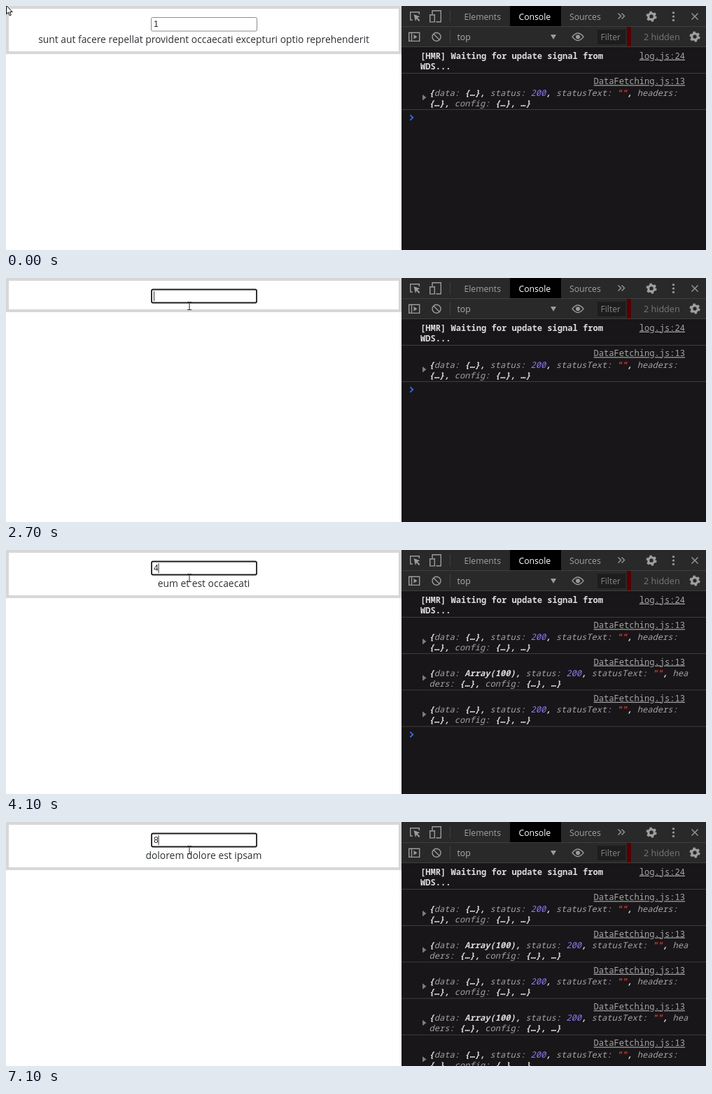
An HTML page that plays this animation: 1000x350 px, repeating every 7200 ms.

```html
<!DOCTYPE html>
<html lang="en">
<head>
<meta charset="utf-8">
<title>Data fetching demo</title>
<style>
  html, body { margin: 0; width: 100%; height: 100%; overflow: hidden; background: #fff; }
  svg { display: block; }
  text { white-space: pre; }
  .ui { font: 12.2px "Open Sans", "Noto Sans", sans-serif; fill: #a2a2a2; }
  .body { font: 13.86px "Open Sans", "Noto Sans", sans-serif; fill: #2b2f33; }
  .field { font: 12px "Liberation Sans", Arial, sans-serif; fill: #2a2a2a; }
  .mono { font: 600 12.08px "Noto Sans Mono", "DejaVu Sans Mono", monospace; fill: #dcdcdc; }
  .obj { font-style: italic; }
  .key { fill: #a3a3a3; font-weight: 500; }
  .num { fill: #8f78f5; font-weight: 500; }
  .str { fill: #d23c36; }
  .link { fill: #a6a6a6; text-decoration: underline; text-anchor: end; font-weight: 400; }
  .icon { fill: none; stroke: #9b9b9b; stroke-width: 1.4; }
  .solid { fill: #9b9b9b; }
  .rule { fill: #3e3e3e; }
</style>
</head>
<body>
<svg width="1000" height="350" viewBox="0 0 1000 350">
  <defs>
    <g id="gear">
      <circle r="4.3" fill="none" stroke="#a0a0a0" stroke-width="3.2"/>
      <circle r="6.4" fill="none" stroke="#a0a0a0" stroke-width="2.4" stroke-dasharray="3.35 3.35"/>
    </g>
  </defs>

  <rect width="1000" height="350" fill="#fff"/>
  <rect id="card" x="2" y="2" width="561" height="65" fill="#fff" stroke="#d7d7d7" stroke-width="4"/>
  <rect id="box" fill="#fff"/>
  <text id="value" class="field" x="211" y="30"></text>
  <rect id="caret" y="19" width="1" height="14" fill="#333"/>
  <text id="post" class="body" x="282.5" y="52.5" text-anchor="middle"></text>

  <rect x="565" width="435" height="350" fill="#181618"/>
  <rect x="565" width="435" height="58" fill="#292929"/>
  <rect x="720" width="73" height="29" fill="#000"/>
  <rect class="rule" x="565" y="29" width="435" height="1"/>
  <rect class="rule" x="565" y="58" width="435" height="1"/>
  <rect class="rule" x="634" y="6" width="1" height="18"/>
  <rect class="rule" x="634" y="35" width="1" height="18"/>
  <rect x="845" y="34" width="40" height="21" fill="#1d1d1d"/>
  <rect x="887" y="30" width="6" height="28" fill="#580000"/>

  <text class="ui" x="654.5" y="20">Elements</text>
  <text class="ui" x="732.5" y="20" style="fill:#fff">Console</text>
  <text class="ui" x="805" y="20">Sources</text>
  <text class="ui" x="644.5" y="49" style="fill:#b0b0b0">top</text>
  <text class="ui" x="849.5" y="49" style="fill:#858585">Filter</text>
  <text class="ui" x="911" y="49" style="fill:#777;font-size:12.6px">2 hidden</text>

  <path class="icon" d="M581 20h-3.3v-11.3h12.6v3.3"/>
  <path class="solid" d="M582.5 12l9 3.3-3.7 1.5 3.6 3.6-1.5 1.5-3.6-3.6-1.4 3.6z"/>
  <path class="icon" d="M609 12v-5.3h12.3v16h-7M605.7 12.7h6.6v10.2h-6.6z"/>
  <path class="icon" d="M874.5 10.5l4 4-4 4M879.5 10.5l4 4-4 4"/>
  <use href="#gear" x="922" y="15"/>
  <g class="solid"><circle cx="953.5" cy="9.7" r="1.6"/><circle cx="953.5" cy="15" r="1.6"/><circle cx="953.5" cy="20.3" r="1.6"/></g>
  <path class="icon" d="M979.5 10.5l9 9m0-9l-9 9"/>

  <path class="icon" d="M575.7 38.2h15v12.2h-15zM579.5 38v12.5"/>
  <path class="solid" d="M582.5 41l5 3.3-5 3.3z"/>
  <circle class="icon" cx="615" cy="44.3" r="6"/>
  <path class="icon" d="M610.8 40.1l8.4 8.4"/>
  <path class="solid" d="M778 41h8l-4 7z"/>
  <path class="icon" d="M809 44.2q8-10.5 16 0q-8 10.5-16 0z"/>
  <circle class="solid" cx="817" cy="44.2" r="3"/>
  <use href="#gear" x="984" y="44"/>

  <text class="mono" x="592" y="75.8">[HMR] Waiting for update signal from</text>
  <text class="mono" x="592" y="91">WDS...</text>
  <text class="mono link" x="970" y="75.8">log.js:24</text>
  <rect class="rule" x="565" y="96" width="435" height="1"/>
  <g id="logs"></g>
  <path id="prompt" d="M577.3 156.3l4 3.8-4 3.8" fill="none" stroke="#3a6ce0" stroke-width="1.8"/>

  <path id="arrow" d="M.5 -.5v12.2l2.8-2.6 2 4.7 2-.9-2-4.5h3.8z" fill="#fff" stroke="#000" stroke-width="1"/>
  <path id="beam" d="M-3 -5.5h2.2l.8.7.8-.7h2.2M0 -5v10M-3 5.5h2.2l.8-.7.8.7h2.2" fill="none" stroke="#333" stroke-width="1.1"/>
</svg>
<script>
const LOOP = 7200, STEP = 100, PITCH = 52.3;
const $ = id => document.getElementById(id);
const set = (el, attrs) => { for (const k in attrs) el.setAttribute(k, attrs[k]); };
const show = (el, on) => { el.style.display = on ? '' : 'none'; };

// Each track lists [start time, value]; the last one started applies.
const at = (track, t) => track.reduce((v, [s, x]) => t >= s ? x : v, track[0][1]);

const values = [[0, '1'], [2500, ''], [3700, '4'], [5100, ''], [6100, '8']];
const posts = [
  [0, 'sunt aut facere repellat provident occaecati excepturi optio reprehenderit'],
  [2700, ''], [3900, 'eum et est occaecati'],
  [5300, ''], [6300, 'dolorem dolore est ipsam']
];
const counts = [[0, 1], [2800, 2], [3900, 3], [5400, 4], [6300, 5]];
const carets = [
  [0, false], [1300, true], [1800, false], [2300, true], [3000, false], [3400, true],
  [4200, false], [4700, true], [5800, false], [6100, true], [6600, false], [7100, true]
];
const path = [[0, 0, 0], [700, 268, 27], [900, 268, 27], [1300, 262, 40]];

const span = (cls, s) => `<tspan class="${cls}">${s}</tspan>`;
const key = s => span('key', s);

function logEntry(i) {
  const list = i % 2;
  const data = list ? 'Array(100)' : '{…}';
  const head = `{${key('data:')} ${data}, ${key('status:')} ${span('num', '200')}, ` +
    `${key('statusText:')} ${span('str', '""')}, ${key(list ? 'hea' : 'headers:')}`;
  const tail = `${list ? key('ders:') + ' ' : ''}{…}, ${key('config:')} {…}, …}`;
  return `<g transform="translate(0 ${i * PITCH})">
    <text class="mono link" x="970" y="112.3">DataFetching.js:13</text>
    <path d="M595 127l5.5 4.2-5.5 4.2z" fill="#7d7d7d"/>
    <text class="mono obj" x="604.5" y="128.5">${head}</text>
    <text class="mono obj" x="604.5" y="143.5">${tail}</text>
    <rect class="rule" x="565" y="148" width="435" height="1"/></g>`;
}
$('logs').innerHTML = [0, 1, 2, 3, 4].map(logEntry).join('');
const entries = [...$('logs').children];

function pointer(t) {
  for (let i = 1; i < path.length; i++) {
    const [t0, x0, y0] = path[i - 1], [t1, x1, y1] = path[i];
    if (t < t1) {
      const u = (t - t0) / (t1 - t0), e = u * u * (3 - 2 * u);
      return [x0 + (x1 - x0) * e, y0 + (y1 - y0) * e];
    }
  }
  return path[path.length - 1].slice(1);
}

function draw(t) {
  const value = at(values, t), post = at(posts, t), n = at(counts, t);
  $('value').textContent = value;
  $('post').textContent = post;
  set($('card'), { height: post ? 65 : 45 });
  set($('box'), t >= 900
    ? { x: 208, y: 16.5, width: 150, height: 19, rx: 2, stroke: '#1c1c1c', 'stroke-width': 1.8 }
    : { x: 207.5, y: 16.5, width: 151, height: 19.5, rx: 2, stroke: '#8a8a8a', 'stroke-width': 1 });
  set($('caret'), { x: value ? 217.5 : 211 });
  show($('caret'), at(carets, t));

  entries.forEach((el, i) => show(el, i < n));
  set($('prompt'), { transform: `translate(0 ${(n - 1) * PITCH})` });

  const [x, y] = pointer(t), typing = x > 207 && y > 16;
  show($('arrow'), !typing);
  show($('beam'), typing);
  set($(typing ? 'beam' : 'arrow'), { transform: `translate(${x} ${y})` });
}

let start;
function tick(now) {
  start ??= now;
  draw(Math.floor(((now - start) % LOOP) / STEP) * STEP);
  requestAnimationFrame(tick);
}
draw(0);
requestAnimationFrame(tick);
</script>
</body>
</html>
```
